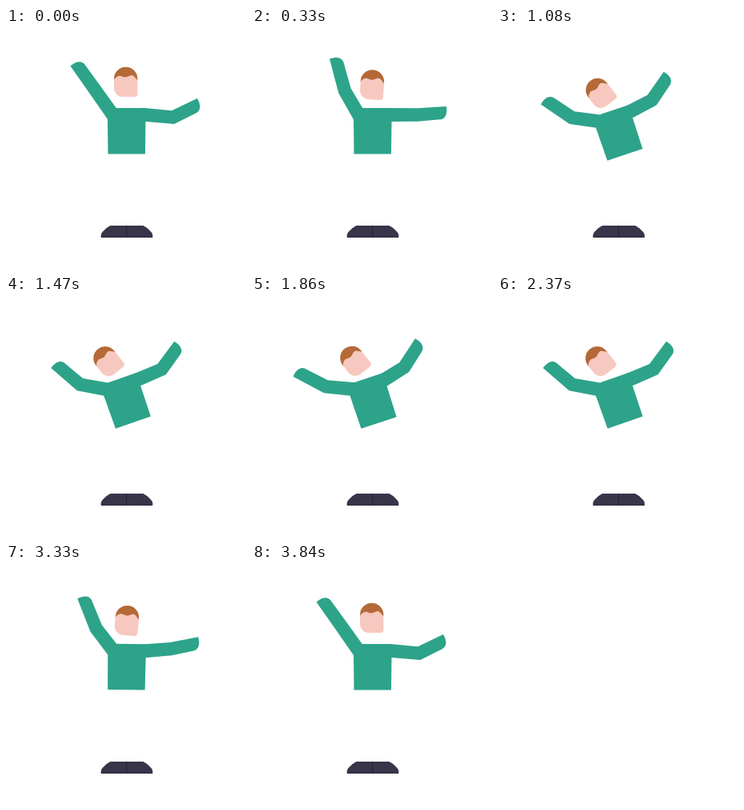
Write an HTML page that moves like this. It is 300 px wide and 300 px high and loops after 5870 ms.

```html
<!DOCTYPE html>
<html lang="en">
<head>
<meta charset="utf-8">
<title>Waving figure</title>
<style>
html, body { margin: 0; width: 100%; height: 100%; overflow: hidden; background: #fff; }
svg { display: block; width: 100%; height: 100%; }
</style>
</head>
<body>
<svg viewBox="0 0 300 300">
  <g id="shoes">
    <path fill="#383449" d="M119 262Q117.6 258 121 254.5Q125 249.5 130.5 247H171.5Q177 249.5 181 254.5Q184.4 258 183 262Z"/>
    <path fill="#302d40" d="M118.7 260.7H183.3L183 262H119Z"/>
    <path stroke="#232030" d="M150.7 247V262"/>
  </g>
  <g fill="#2da38a">
    <path id="torso" d="M-12.5 -57.5H24L23.3 0H-23.2L-23.7 -43Z"/>
    <path id="left"/>
    <path id="right"/>
  </g>
  <g id="head">
    <path fill="#f7c8bf" d="M-14.7 -4L-8 -10H8L14.7 -4V14.5Q14.7 18.5 10.7 18.5H-3.7A11 11 0 0 1 -14.7 7.5Z"/>
    <path fill="#b46936" d="M-14.7 -2.5V-4A14.7 14.7 0 0 1 14.7 -4V-2.5C12 -4.5 11 -7.5 8.5 -8.3C5 -9.2 3 -6 -1 -6C-4 -6 -6 -8.3 -9 -7.5C-12 -6.5 -14 -4.5 -14.7 -2.5Z"/>
  </g>
</svg>
<script>
const LOOP = 5870, STEP = 30, END = 3840;
const RAD = Math.PI / 180;
const [torso, left, right, head] =
  ['torso', 'left', 'right', 'head'].map(id => document.getElementById(id));

// Arms: upper and fore angle of the left, then of the right, above the horizontal.
const REST = { tilt: 0, nod: 0, neck: 90, arms: [54.7, 54.7, -5.3, 26] };
const WIND = { tilt: 0.8, nod: 5, neck: 86.7, arms: [60, 75, 0, 4] };
const LEAN = { tilt: -17.9, nod: -38, neck: 83.7, arms: [4, 25, 34.3, 57.6] };
const DIP = { tilt: -1.2, arms: [6.5, 16, -11.5, -4] };

// Rest, wind up, lean, hold, swing back, rest. The arms trail the body.
const BODY = { wound: 260, leant: 860, leave: 2900, back: 3300 };
const ARMS = { wound: 320, leant: 880, leave: 2960, back: 3440 };

function ease(t, from, to) {
  const u = Math.min(1, Math.max(0, (t - from) / (to - from)));
  return u * u * (3 - 2 * u);
}

// Returns a blend of the three poses that fits time t.
function blender(t, { wound, leant, leave, back }) {
  const wind = ease(t, 0, wound) - ease(t, back, END);
  const lean = ease(t, wound, leant) - ease(t, leave, back);
  return (rest, wind1, lean1) => {
    const base = rest + (wind1 - rest) * wind;
    return base + (lean1 - base) * lean;
  };
}

// Two bounces of the arms while the body leans.
function bounce(t) {
  const u = (t - ARMS.leant) / (ARMS.leave - ARMS.leant);
  return u > 0 && u < 1 ? Math.abs(Math.sin(2 * Math.PI * u)) : 0;
}

// Point at distance u along a direction and v across it; angles run counterclockwise.
function offset([x, y], deg, u, v) {
  const c = Math.cos(deg * RAD), s = Math.sin(deg * RAD);
  return [x + u * c - v * s, y - u * s - v * c];
}

function sleeve(shoulder, upper, fore, upperLen, foreLen) {
  const elbow = offset(shoulder, upper, upperLen, 0);
  const mid = (upper + fore) / 2;
  const miter = 8.2 / Math.cos((fore - upper) / 2 * RAD);
  const tip = (u, v) => offset(elbow, fore, foreLen + u, v);
  const p = [
    offset(shoulder, upper, -4, 8.5), offset(elbow, mid, 0, miter), tip(0, 8),
    tip(1, -2), tip(-3, -7.8), tip(-9, -7.8),
    offset(elbow, mid, 0, -miter), offset(shoulder, upper, -4, -8.5)
  ].map(q => q.map(n => n.toFixed(2)).join(' '));
  return `M${p[0]}L${p[1]}L${p[2]}C${p[3]} ${p[4]} ${p[5]}L${p[6]}L${p[7]}Z`;
}

function place(node, [x, y], deg) {
  node.setAttribute('transform', `translate(${x} ${y}) rotate(${deg})`);
}

function draw(t) {
  const body = blender(t, BODY), limb = blender(t, ARMS), dip = bounce(t);
  const part = key => body(REST[key], WIND[key], LEAN[key]);
  const tilt = part('tilt') + DIP.tilt * dip;
  const nod = part('nod');
  const [lu, lf, ru, rf] = REST.arms.map((a, i) =>
    limb(a, WIND.arms[i], LEAN.arms[i]) + DIP.arms[i] * dip);

  const hip = [150.7 - 0.43 * tilt, 157.5 - 1.8 * Math.sin(tilt * Math.PI / 22)];
  const onBody = (x, y) => offset(hip, -tilt, x, -y);

  place(torso, hip, tilt);
  place(head, onBody(-1 + 0.115 * nod, -part('neck')), nod);
  left.setAttribute('d', sleeve(onBody(-18.1, -50.2), 180 - lu, 180 - lf,
    33.4, 45.5 - 0.15 * Math.abs(lf - lu)));
  right.setAttribute('d', sleeve(onBody(23.3, -49), ru, rf,
    33.4 - 0.28 * (ru + tilt), 36 + 0.05 * Math.abs(rf - ru)));
}

const start = performance.now();
function tick() {
  const t = (performance.now() - start) % LOOP;
  draw(Math.floor(t / STEP) * STEP);
  requestAnimationFrame(tick);
}
tick();
</script>
</body>
</html>
```
